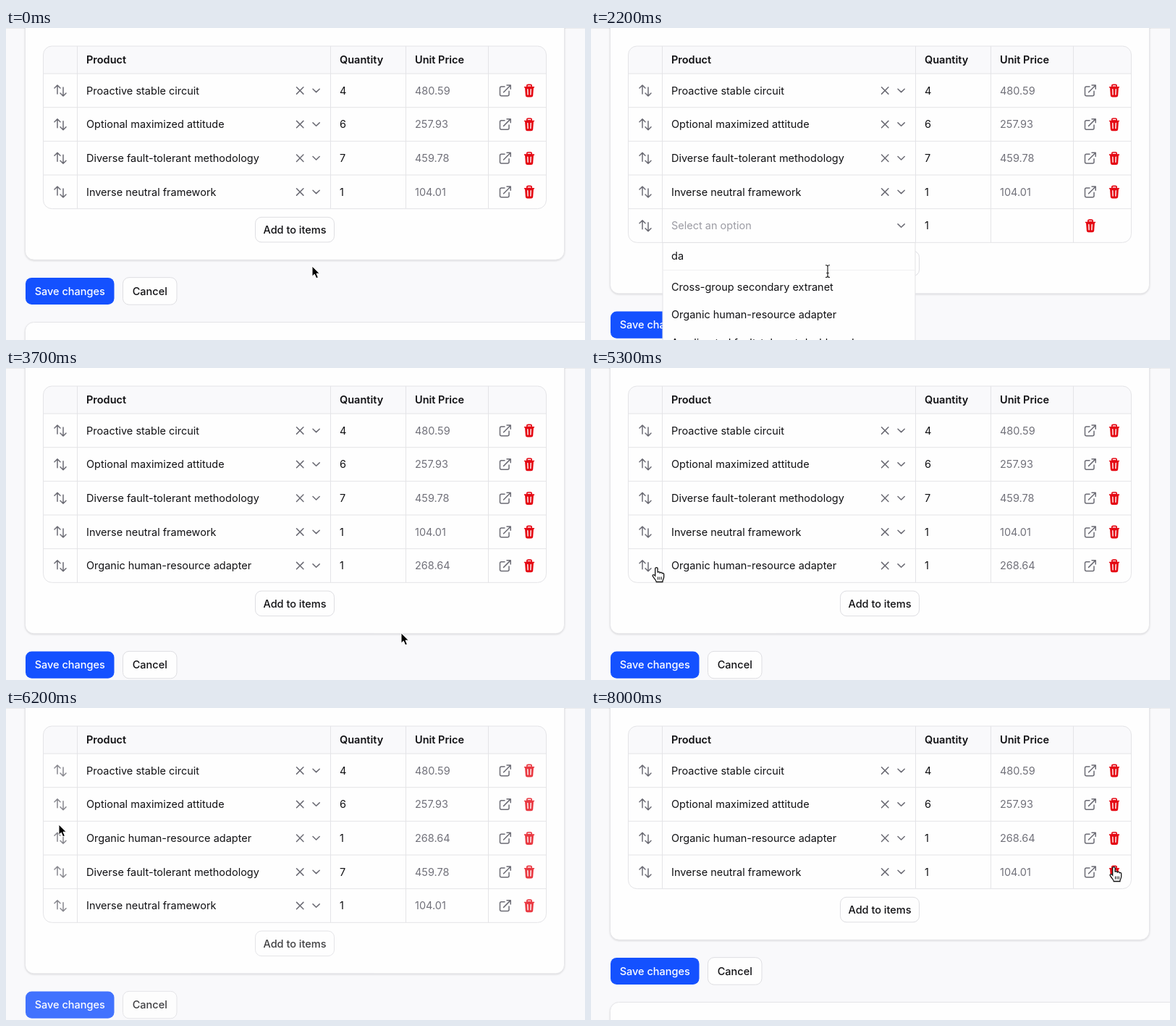
Write an HTML page that moves like this. It is 800 px wide and 431 px high and loops after 8400 ms.

```html
<!DOCTYPE html>
<html lang="en">
<head>
<meta charset="utf-8">
<title>Order items</title>
<style>
  html, body { margin: 0; width: 100%; height: 100%; overflow: hidden; background: #f9f9fb; }
  svg { display: block; font: 14.5px Inter, "Liberation Sans", sans-serif; }
  .card { fill: #fefefe; stroke: #e6e6e9; filter: drop-shadow(0 1px 1px rgba(0,0,0,.13)); }
  .line { fill: none; stroke: #e4e4e7; }
  .icon { fill: none; stroke: #6b6b74; stroke-width: 1.5; stroke-linecap: round; stroke-linejoin: round; }
</style>
</head>
<body>
<svg id="stage" width="800" height="431" viewBox="0 0 800 431"></svg>
<script>
const LOOP = 8400, STEP = 100, TOP = 63, ROW = 46.67;
const INK = '#111114', GREY = '#71717a', PALE = '#9b9ba3', RED = '#e50914';

const items = [
  ['Proactive stable circuit', 4, '480.59'],
  ['Optional maximized attitude', 6, '257.93'],
  ['Diverse fault-tolerant methodology', 7, '459.78'],
  ['Inverse neutral framework', 1, '104.01'],
  ['Organic human-resource adapter', 1, '268.64']
];
const matches = ['Cross-group secondary extranet', items[4][0], 'Ameliorated fault-tolerant dashboard'];

// Moments of the story, in ms
const ADDED = 700, OPENED = 1400, SEARCHED = 1700, PICKED = 2700, PRICED = 2900;
const GRABBED = 5400, DROPPED = 5900, REMOVED = 7700;
const busySpans = [[500, 700], [PICKED, 3200], [DROPPED, 6400], [7400, 8000]];

// time, x, y, shape
const pointerPath = [
  [0, 423, 329, 'arrow'], [400, 399, 275, 'hand'], [900, 399, 275, 'hand'],
  [1300, 348.5, 275.5, 'hand'], [1400, 345, 280, 'hand'], [1500, 327, 336, 'beam'],
  [2200, 327, 336, 'beam'], [2500, 322, 392, 'hand'], [2700, 322, 392, 'arrow'],
  [3400, 322, 392, 'arrow'], [3700, 546, 366, 'arrow'], [4100, 610, 310, 'arrow'],
  [4400, 610, 310, 'arrow'], [4800, 420, 330, 'arrow'], [4900, 420, 330, 'arrow'],
  [5300, 90.5, 275.5, 'hand'], [GRABBED, 76, 270, 'arrow'], [5800, 73, 161, 'arrow'],
  [6600, 73, 161, 'arrow'], [7200, 722.5, 219.5, 'hand'], [LOOP, 722.5, 219.5, 'hand']
];

const pointerShapes = {
  arrow: '<path d="M0 0V14.2L3.3 11.2 5.7 16.8 8.4 15.6 6 10.2H10.3Z" stroke="#fff" stroke-linejoin="round"/>',
  hand: `<path d="M-1.8 2C-1.8-.6 1.6-.6 1.6 2V7C2.2 5.6 4.6 5.8 4.8 7.4 5.6 6.4 7.6 6.8 7.8 8.2
    8.8 7.5 10.2 8.2 10.2 9.6V13C10.2 16 8.4 17 8.4 20H-.2C-.6 17-5 13.5-5.4 11.4-5.4 9.6-3.4 9.6-1.8 11.6Z"
    fill="#fff" stroke="#111" stroke-width="1.3"/><path d="M2 13v4m2.4-4v4m2.4-4v4" stroke="#111"/>`,
  beam: '<path d="M-3-8.5Q0-8.5 0-6.5Q0-8.5 3-8.5M0-7V7M-3 8.5Q0 8.5 0 6.5Q0 8.5 3 8.5M-1.8 2.5H1.8" fill="none" stroke="#222" stroke-width="1.2"/>'
};

const clamp = v => Math.max(0, Math.min(1, v));
const smooth = v => (v = clamp(v), v * v * (3 - 2 * v));
const group = (x, y, body, opacity = 1) => `<g transform="translate(${x} ${y})" opacity="${opacity}">${body}</g>`;
const text = (x, y, s, fill = INK, weight = 400, anchor = 'start') =>
  `<text x="${x}" y="${y}" fill="${fill}" font-weight="${weight}" text-anchor="${anchor}">${s}</text>`;
const rect = (x, y, w, h, attrs) => `<rect x="${x}" y="${y}" width="${w}" height="${h}" ${attrs}/>`;
const icon = (d, attrs = '') => `<path class="icon" d="${d}" ${attrs}/>`;

const trash = (x, opacity) => group(x, 23.4, `<g fill="none" stroke="${RED}" stroke-width="1.6" stroke-linecap="round">
  <path d="M-6.4-4.6Q0-5.8 6.4-4.6M-3.2-5.4V-6.4Q-3.2-8-1.4-8H1.4Q3.2-8 3.2-6.4V-5.4"/>
  <path d="M-5.2-4.2L-4.4 6.8Q-4.2 8.4-2.6 8.4H2.6Q4.2 8.4 4.4 6.8L5.2-4.2Z" fill="${RED}"/>
  <path d="M-2.2-1.6L-1.9 5.6M2.2-1.6L1.9 5.6" stroke="#fff" stroke-width="1.4"/></g>`, opacity);

function row([name, quantity, price], opacity, empty) {
  return rect(52, 0, 695, ROW, 'fill="#fefefe"')
    + `<g opacity="${opacity}">${icon('M71 28V16m-4 4 4-4 4 4M79 19V31m-4-4 4 4 4-4')}</g>`
    + text(111, 28.5, empty ? 'Select an option' : name, empty ? PALE : INK)
    + (empty ? '' : icon('M401.5 18.7l9.4 9.4m0-9.4l-9.4 9.4'))
    + icon('M424 21.2l4.6 4.4 4.6-4.4')
    + text(461, 28.5, quantity)
    + (price ? text(565, 28.5, price, GREY) : '')
    + (empty ? '' : icon('M689 18H684.5Q682.5 18 682.5 20V28.7Q682.5 30.7 684.5 30.7H693Q695 30.7 695 28.7V24.3M687.5 25.7L697 16.2M692 16H697.2V21.2'))
    + trash(empty ? 690 : 723, opacity);
}

function button(x, y, w, h, label, primary, opacity) {
  const look = primary ? 'fill="#1451ff"' : 'fill="#fefefe" stroke="#dedee2"';
  return `<g opacity="${opacity}">${rect(x, y, w, h, `rx="8.5" ${look}`)}`
    + text(x + w / 2, y + h / 2 + 5.2, label, primary ? '#fff' : INK, 500, 'middle') + '</g>';
}

function dropdown(t) {
  const found = t >= SEARCHED;
  const options = found ? matches : items.slice(0, 3).map(item => item[0]);
  let body = rect(99, 296.5, 349, 160, 'fill="#fefefe" stroke="#e2e2e5"')
    + text(111, 320, found ? 'da' : 'Start typing to search...', found ? INK : PALE)
    + '<path d="M99 334.5H448" stroke="#f0f0f2"/>';
  if (t >= 2400) body += rect(103, 377, 341, 38, 'rx="6" fill="#f4f4f5"');
  options.forEach((name, i) => body += text(111, 362.7 + 38.6 * i, name));
  return body;
}

function pointerAt(t) {
  const next = pointerPath.findIndex(key => key[0] > t);
  const [t0, x0, y0, shape] = pointerPath[next - 1], [t1, x1, y1] = pointerPath[next];
  const k = smooth((t - t0) / (t1 - t0));
  return { x: x0 + (x1 - x0) * k, y: y0 + (y1 - y0) * k, shape };
}

// Vertical slot of each item, in row heights; null when absent
function slots(t) {
  const first = smooth((t - 5500) / 200), second = smooth((t - 5600) / 200);
  const list = [0, 1, 2 + second, 3 + first, 4 - first - second];
  if (t < ADDED) list[4] = null;
  if (t >= REMOVED) {
    list[2] = null;
    list[3] = 3;
  }
  return list;
}

function scene(t) {
  const busy = busySpans.some(([a, b]) => t >= a && t < b) ? 0.8 : 1;
  const places = slots(t), count = places.filter(p => p !== null).length;
  const bottom = TOP + ROW * count, pointer = pointerAt(t);
  const frame = `x="51.5" y="25" width="695" height="${bottom - 25}" rx="12"`;
  const newest = t < PRICED ? [items[4][0], 1, ''] : items[4];
  const drawRow = i => row(i === 4 ? newest : items[i], busy, i === 4 && t < PICKED);

  let out = '<path d="M0 .5H800" stroke="#ebebed"/>'
    + rect(26.5, -30, 745, bottom + 100.5, 'rx="12" class="card"')
    + rect(26.5, bottom + 156.8, 900, 200, 'rx="12" class="card"')
    + `<clipPath id="table"><rect ${frame}/></clipPath><g clip-path="url(#table)">`
    + rect(51, 25, 696, 38, 'fill="#f9f9fb"');
  [4, 0, 1, 2, 3].forEach(i => {
    if (places[i] !== null) out += group(0, TOP + ROW * places[i], drawRow(i));
  });
  for (let i = 0; i < count; i++) out += `<path class="line" d="M51 ${TOP + ROW * i}H747"/>`;
  for (const x of [98.5, 448.5, 552.5, 666.5]) out += `<path class="line" d="M${x} 25V${bottom}"/>`;
  out += `</g><rect ${frame} class="line"/>`
    + text(111, 49, 'Product', INK, 600) + text(461, 49, 'Quantity', INK, 600) + text(565, 49, 'Unit Price', INK, 600)
    + button(344.5, bottom + 11.7, 109, 34.5, 'Add to items', false, busy)
    + button(27, bottom + 95.2, 122.5, 37.2, 'Save changes', true, busy)
    + button(161.5, bottom + 95, 74.5, 37.5, 'Cancel', false, busy);

  if (t >= OPENED && t < PICKED) out += dropdown(t);
  if (t > GRABBED && t < DROPPED)
    out += group(pointer.x - 76, TOP + ROW * 4 + pointer.y - 270, drawRow(4), 0.55);
  return out + group(pointer.x, pointer.y, pointerShapes[pointer.shape]);
}

const stage = document.getElementById('stage');
const start = performance.now();
let shown = -1;

function tick() {
  const t = Math.floor((performance.now() - start) % LOOP / STEP) * STEP;
  if (t !== shown) stage.innerHTML = scene(shown = t);
  requestAnimationFrame(tick);
}
tick();
</script>
</body>
</html>
```
